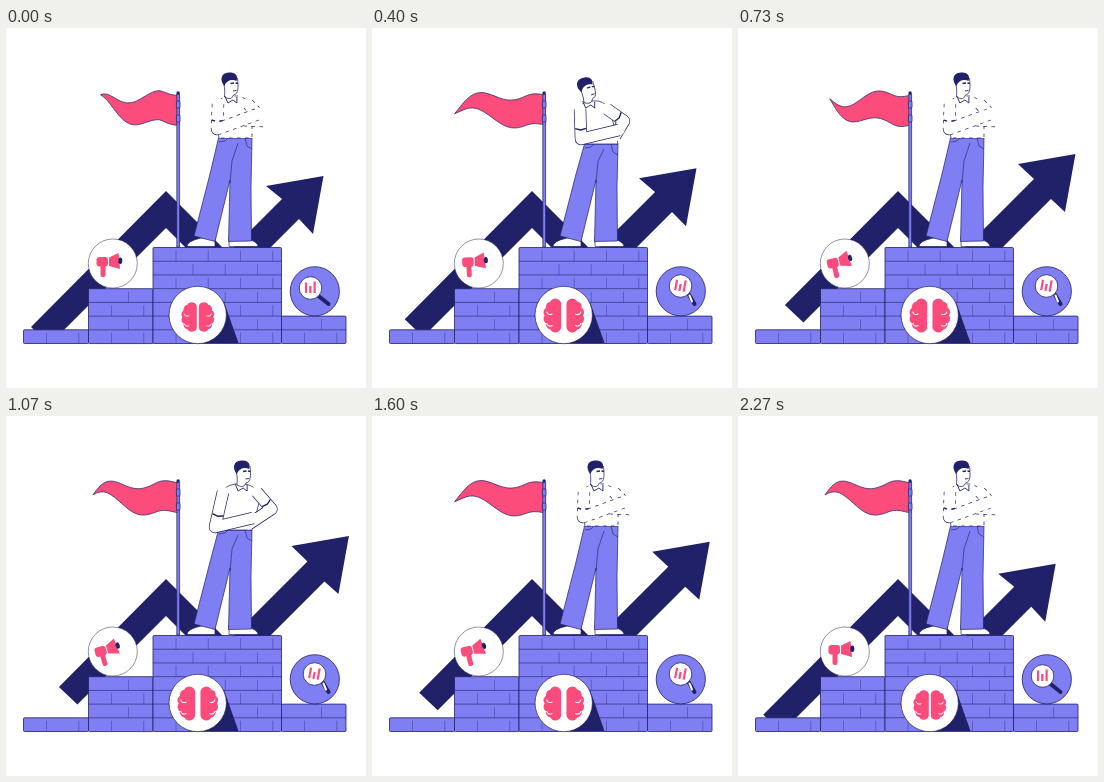
These frames come from a looping animation (360x360 px, 2.34 s). An HTML page with a canvas:

```html
<!DOCTYPE html>
<html lang="en">
<head>
<meta charset="utf-8">
<title>Growth podium</title>
<style>
html, body { margin: 0; width: 100%; height: 100%; overflow: hidden; background: #fff; }
canvas { display: block; width: 360px; height: 360px; }
</style>
</head>
<body>
<canvas id="stage" width="360" height="360"></canvas>
<script>
const ctx = document.getElementById('stage').getContext('2d');
const LOOP = 2340, FLAG_LOOP = 600, TAU = Math.PI * 2;
const BLUE = '#7f7ef2', NAVY = '#202168', PINK = '#fb4c7c', WHITE = '#fff';

const mix = (a, b, k) => a + (b - a) * k;
const smooth = k => k * k * (3 - 2 * k);
// Rises to 1 at the centre and falls back to 0 within the given reach.
const bump = (t, centre, reach) => smooth(Math.max(0, 1 - Math.abs(t - centre) / reach));

function paint(fill, line, width = 0.8) {
  if (fill) { ctx.fillStyle = fill; ctx.fill(); }
  if (line) { ctx.strokeStyle = line; ctx.lineWidth = width; ctx.stroke(); }
}

function trace(points) {
  ctx.beginPath();
  points.forEach(([x, y]) => ctx.lineTo(x, y));
}

function polygon(points, fill, line, width) {
  trace(points);
  ctx.closePath();
  paint(fill, line, width);
}

function open(points, line, width) {
  trace(points);
  paint(null, line, width);
}

function disc(x, y, r, fill, line, width) {
  ctx.beginPath();
  ctx.arc(x, y, r, 0, TAU);
  paint(fill, line, width);
}

function box(x, y, w, h, r, fill, line, width) {
  ctx.beginPath();
  ctx.roundRect(x, y, w, h, r);
  paint(fill, line, width);
}

function at(x, y, angle, scale, draw) {
  ctx.save();
  ctx.translate(x, y);
  ctx.rotate(angle);
  ctx.scale(scale, scale);
  draw();
  ctx.restore();
}

// The shaft keeps its zigzag; both ends slide along the diagonal.
function drawArrow(p) {
  const s = 25.5 * p, tail = 28 * p, rise = 28 * p;
  ctx.save();
  ctx.beginPath();
  ctx.rect(0, 0, 360, 308);
  ctx.clip();
  polygon([[25 + tail, 299 - tail], [160, 163], [222, 225],
    [276 + s, 171 - s], [260 + s, 158 - rise], [317.5 + s, 148 - rise],
    [307 + s, 206 - rise], [293 + s, 191 - s],
    [222, 262], [160, 200], [43.5 + tail, 316.5 - tail]], NAVY);
  ctx.restore();
}

function drawFlag(t) {
  const phase = t / FLAG_LOOP, steps = 24, top = [], bottom = [];
  const tipX = 88 + 7 * Math.cos(TAU * (phase - 0.06));
  for (let i = 0; i <= steps; i++) {
    const u = i / steps;
    const swing = 4.5 * Math.min(1, 4 * u) + 6.5 * u ** 4;
    const middle = 82 - 5 * u * u + swing * Math.cos(TAU * ((u - 0.6) / 0.71 - phase));
    const half = 15 * (1 - u ** 2.6);
    const x = mix(173, tipX, u);
    top.push([x, middle - half]);
    bottom.unshift([x, middle + half]);
  }
  polygon([...top, ...bottom], PINK, NAVY, 0.7);
  box(170.8, 66, 2.8, 153, 0, BLUE, NAVY, 0.7);
  for (const y of [73, 87]) box(170.4, y, 3.6, 7, 1, BLUE, NAVY, 0.7);
  disc(172.1, 65, 1.7, NAVY);
}

function drawBlock(x, y, width, rows) {
  const h = 96 / 7, tile = 64.5;
  box(x, y, width, rows * h, 1, BLUE, NAVY);
  for (let r = 0; r < rows; r++) {
    const top = y + r * h;
    if (r) open([[x, top], [x + width, top]], NAVY, 0.6);
    const first = (rows - r) % 2 ? 23 : 40;
    for (let j = first; j < width; j += tile / 2)
      open([[x + j, top + 3], [x + j, top + h]], '#41419f', 0.55);
  }
}

function drawPodium() {
  drawBlock(17.5, 301.8, 65, 1);
  drawBlock(82.5, 260.7, 64.5, 4);
  drawBlock(275.5, 288.1, 64.5, 2);
  drawBlock(147, 219.5, 128.5, 7);
  polygon([[218, 274], [232.5, 315], [194, 315]], NAVY);
}

function drawMegaphone(p) {
  const tilt = smooth(Math.min(1, p));
  disc(106.8, 235.5, 24.5, WHITE, NAVY, 0.5);
  at(102 - 1.5 * tilt, 235, -0.28 * tilt, 1, () => {
    box(-7.5, 1, 5, 13, 2, PINK);
    box(-11.5, -6, 11.5, 9.5, 3, PINK);
    polygon([[1, -5.5], [10.5, -10], [12, 6], [1, 3]], PINK);
    ctx.beginPath();
    ctx.ellipse(12.3, -2.2, 2, 3.2, 0, 0, TAU);
    paint(NAVY);
  });
}

function drawHalfBrain(gap) {
  ctx.save();
  ctx.translate(gap, 0);
  box(0.5, -14, 9, 28, 4, PINK);
  for (let i = 0; i < 6; i++) {
    const a = mix(-1.4, 1.4, i / 5);
    disc(4.5 + 7 * Math.cos(a), 10.3 * Math.sin(a), 4.6, PINK);
  }
  for (const y of [-4, 6]) {
    ctx.beginPath();
    ctx.arc(10, y, 3.2, 0.2, 2.2);
    paint(null, WHITE, 0.9);
  }
  ctx.restore();
}

function drawBrain(q) {
  disc(191.7, 287, 28.7, WHITE, NAVY, 0.7);
  at(191.8, 289 - 1.5 * q, 0, 1 + 0.15 * q, () => {
    const gap = 0.5 + 1.3 * q;
    drawHalfBrain(gap);
    ctx.scale(-1, 1);
    drawHalfBrain(gap);
  });
}

function drawMagnifier(q) {
  const x = 304.5 + 4 * q, y = 260 - 2 * q;
  disc(308.8, 263.3, 24.6, BLUE, NAVY);
  ctx.lineCap = 'round';
  open([[x + 8, y + 8], [322.5, 276]], NAVY, 4);
  open([[x + 9, y + 9.5], [320, 273.5]], WHITE, 2 * q);
  ctx.lineCap = 'butt';
  disc(x, y, 11.3, WHITE, NAVY);
  at(x, y, 0.18 * q, 1, () => {
    [10.5, 7, 11.5].forEach((h, i) => box(4.3 * (i - 1) - 1.3, 5 - h, 2.2, h, 0, PINK));
  });
}

function drawShoe(x, width, facing) {
  at(x, 0, 0, 1, () => {
    ctx.scale(facing, 1);
    ctx.beginPath();
    ctx.moveTo(0, 209);
    ctx.lineTo(width * .5, 210);
    ctx.quadraticCurveTo(width, 213, width, 218.5);
    ctx.lineTo(0, 218.5);
    ctx.closePath();
    paint(WHITE, NAVY, 0.7);
  });
}

function drawTrousers(waist) {
  drawShoe(209, 28, -1);
  drawShoe(223, 29, 1);
  polygon([[212.5, waist], [246, waist], [245, 160], [245.5, 213], [222.5, 213.5],
    [224, 152], [209, 213.5], [188, 208], [204, 146]], BLUE, NAVY, 0.7);
  open([[224, 155], [226, 133], [232, waist + 5]], NAVY, 0.6);
  open([[213, waist + 4], [219, waist + 3], [222, waist]], NAVY, 0.6);
  open([[239, waist], [241, waist + 8], [246, waist + 11]], NAVY, 0.6);
}

function drawArm(shoulder, elbow, hand) {
  const limb = [shoulder, elbow, hand];
  open(limb, NAVY, 12.4);
  ctx.save();
  ctx.setLineDash([]);
  ctx.lineCap = 'round';
  open(limb, WHITE, 11);
  ctx.restore();
  const angle = Math.atan2(elbow[1] - shoulder[1], elbow[0] - shoulder[0]);
  at(mix(shoulder[0], elbow[0], .65), mix(shoulder[1], elbow[1], .65), angle, 1,
    () => open([[0, -5.5], [1.5, 0], [0, 5.5]], NAVY, 1.4));
}

function drawHead(x, y, tilt) {
  at(x, y, tilt, 1, () => {
    ctx.beginPath();
    ctx.moveTo(-6, 2);
    ctx.bezierCurveTo(-4, 8, -5, 13, -5, 16);
    ctx.quadraticCurveTo(2, 20, 4, 14);
    ctx.bezierCurveTo(9, 13, 9, 7, 8, -3);
    paint(WHITE, NAVY, 0.75);
    ctx.beginPath();
    ctx.moveTo(-5, 5);
    ctx.bezierCurveTo(-10, 0, -9, -9, 0, -8.5);
    ctx.bezierCurveTo(6, -9, 9, -5, 7, 0);
    ctx.bezierCurveTo(3, -2, -3, -1, -5, 5);
    paint(NAVY);
    open([[1, 2.5], [4.5, 2]], NAVY, 1.3);
    open([[6, 2], [8.5, 2.5]], NAVY, 1.3);
    open([[3.5, 10], [7, 9.5]], NAVY, 0.9);
  });
}

// Folded arms are the resting pose; he leans back once and then stands tall.
function drawMan(t) {
  const lean = bump(t, 400, 340), stand = bump(t, 1070, 340);
  const low = lean + stand, sway = 12.5 * stand - 10 * lean;
  const waist = 110 + 6 * lean + 4 * stand, drop = 5 * lean;
  const left = [212 + .4 * sway, 76 + drop], right = [242 + .7 * sway, 76 + drop];
  const neck = mix(left[0], right[0], .5), collar = left[1] - 8;
  const ink = mix(.45, 1, low);

  drawTrousers(waist);
  ctx.lineJoin = 'round';
  ctx.setLineDash(ink > .9 ? [] : [ink * 8, (1 - ink) * 8]);
  ctx.beginPath();
  ctx.moveTo(213, waist);
  ctx.lineTo(left[0] - 4, left[1] + 4);
  ctx.quadraticCurveTo(left[0], left[1] - 6, neck - 5, collar);
  ctx.lineTo(neck + 5, collar);
  ctx.quadraticCurveTo(right[0], right[1] - 6, right[0] + 4, right[1] + 4);
  ctx.lineTo(246, waist);
  ctx.closePath();
  paint(WHITE, NAVY, 0.75);
  drawArm(right, [258 + .6 * sway, 93], [236 + 7 * low, 92 + 16 * low]);
  drawArm(left, [211 - 2 * low, 101 + 10 * low], [255 - 8 * low, 85 + 17 * low]);
  ctx.setLineDash([]);

  const headX = 223.5 + sway;
  drawHead(headX, 53 + drop, -.22 * lean);
  const x = mix(neck, headX, .6), y = 68 + drop;
  open([[x - 6, y], [x - 3, y + 7], [x + 2, y + 4], [x + 6, y + 7], [x + 6, y + 1]], NAVY, 0.9);
}

function render(now) {
  const t = now % LOOP;
  const wave = 0.5 - 0.5 * Math.cos(TAU * t / LOOP);
  const p = wave + 0.9 * wave ** 3 * (1 - wave);
  const early = smooth(Math.min(1, p * 4));
  ctx.fillStyle = WHITE;
  ctx.fillRect(0, 0, 360, 360);
  drawArrow(p);
  drawFlag(t);
  drawPodium();
  drawMan(t);
  drawMegaphone(p);
  drawBrain(early);
  drawMagnifier(early);
}

const start = performance.now();
function tick() {
  render(performance.now() - start);
  requestAnimationFrame(tick);
}
tick();
</script>
</body>
</html>
```
